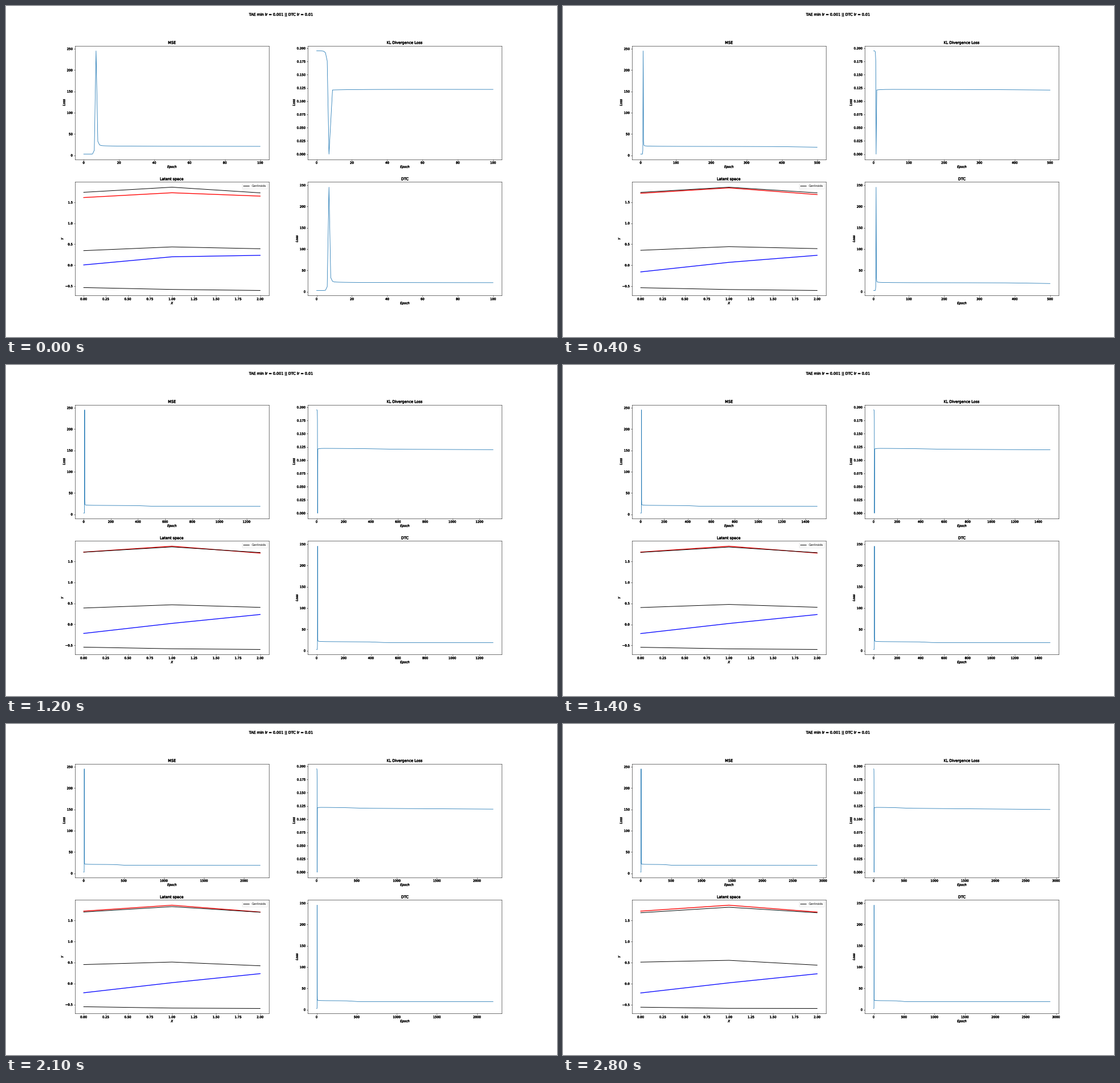
Animation of 966x580 px, one loop 2900 ms. Source, as a matplotlib script:

```python
import numpy as np
import matplotlib.pyplot as plt
from matplotlib.animation import FuncAnimation
from matplotlib.patheffects import withStroke

WIDTH, HEIGHT, DPI = 966, 580, 38.64
FRAMES, INTERVAL, STEP = 29, 100, 100
SPIKE = 7  # epoch where the training blows up for a moment
EPS = 1e-6  # keeps the pixel size from rounding down

plt.rcParams.update({
    "font.family": "DejaVu Sans",
    "font.size": 10,
    "figure.subplot.bottom": 0.125,
    "axes.linewidth": 1.0,
    "xtick.major.width": 1.0,
    "ytick.major.width": 1.0,
    "toolbar": "None",
})


def step_down(epoch, center, width):
    return 1 / (1 + np.exp((epoch - center) / width))


def mse_loss(epoch):
    """Flat start, one spike, then a decaying tail with a late small drop."""
    before = 2.8 + 9 * np.exp(3 * (np.minimum(epoch, SPIKE) - 6))
    n = np.maximum(epoch - SPIKE, 1)
    after = (18.6 + 1.9 * step_down(epoch, 440, 30)
             + 9 * np.exp(-2 * (n - 1)) + 3.5 * n ** -0.4)
    loss = np.where(epoch < SPIKE, before, after)
    loss[SPIKE] = 245.2
    return loss


def kl_loss(epoch):
    """Plateau, a dip to zero, then a lower plateau that sinks slowly."""
    before = 0.195 - 0.019 * np.exp(1.7 * (np.minimum(epoch, SPIKE) - 6))
    after = (0.1212 + 0.0012 * step_down(epoch, 440, 60) - 1e-6 * epoch
             - 0.0012 * np.exp(-np.maximum(epoch - 9, 0) / 12))
    loss = np.where(epoch < SPIKE, before, after)
    loss[SPIKE] = 0
    loss[SPIKE + 1] /= 2
    return loss


def drift(power):
    """Progress from 0 to 1 that speeds up slightly over the run."""
    return lambda epoch: ((epoch - STEP) / (STEP * (FRAMES - 1))) ** power


def settle(*tau):
    """Progress from 0 to 1 that approaches its end exponentially."""
    return lambda epoch: 1 - np.exp((STEP - epoch) / np.array(tau))


epochs = np.arange(FRAMES * STEP + 1)
mse, kl = mse_loss(epochs), kl_loss(epochs)

fig, axes = plt.subplots(2, 2, dpi=DPI, facecolor="white",
                         figsize=((WIDTH + EPS) / DPI, (HEIGHT + EPS) / DPI))
(ax_mse, ax_kl), (ax_latent, ax_dtc) = axes
heavy = [withStroke(linewidth=0.8, foreground="black")]
fig.suptitle("TAE min lr = 0.001 || DTC lr = 0.01", y=0.9775,
             path_effects=heavy)


def label(ax, title, xlabel, ylabel):
    ax.set_title(title, path_effects=heavy)
    ax.set_xlabel(xlabel, style="italic", path_effects=heavy)
    ax.set_ylabel(ylabel, style="italic", path_effects=heavy)


losses = []
for ax, title, values in [(ax_mse, "MSE", mse),
                          (ax_kl, "KL Divergence Loss", kl),
                          (ax_dtc, "DTC", mse + 0.1 * kl)]:
    label(ax, title, "Epoch", "Loss")
    line, = ax.plot([], [], color="tab:blue", lw=1.5)
    losses.append((line, values))

label(ax_latent, "Latent space", "X", "Y")
latent = []


def add_latent(color, width, start, end, progress):
    line, = ax_latent.plot(start, color=color, lw=width)
    latent.append((line, np.array(start), np.array(end), progress))
    return line


add_latent("red", 2.5, (1.615, 1.729, 1.649), (1.722, 1.863, 1.700),
           settle(170, 220, 400))
add_latent("blue", 2.4, (0.006, 0.200, 0.235), (-0.220, 0.020, 0.235),
           settle(300))
centroid = add_latent("black", 1.8, (1.740, 1.862, 1.727),
                      (1.684, 1.815, 1.683), drift(1.2))
add_latent("black", 1.8, (0.347, 0.436, 0.392), (0.512, 0.555, 0.440),
           drift(1.6))
add_latent("black", 1.8, (-0.535, -0.580, -0.604), (-0.558, -0.585, -0.588),
           drift(1.2))
ax_latent.legend([centroid], ["Centroids"], loc="upper right")


def update(i):
    epoch = STEP * (i + 1)
    for line, values in losses:
        line.set_data(epochs[:epoch + 1], values[:epoch + 1])
    for line, start, end, progress in latent:
        line.set_ydata(start + (end - start) * progress(epoch))
    for ax in axes.flat:
        ax.relim()
        ax.autoscale_view()
        for text in ax.get_xticklabels() + ax.get_yticklabels():
            text.set_path_effects(heavy)
    return []


anim = FuncAnimation(fig, update, frames=FRAMES, interval=INTERVAL,
                     init_func=lambda: update(0), repeat=True, repeat_delay=0,
                     blit=False)
plt.show()
```
